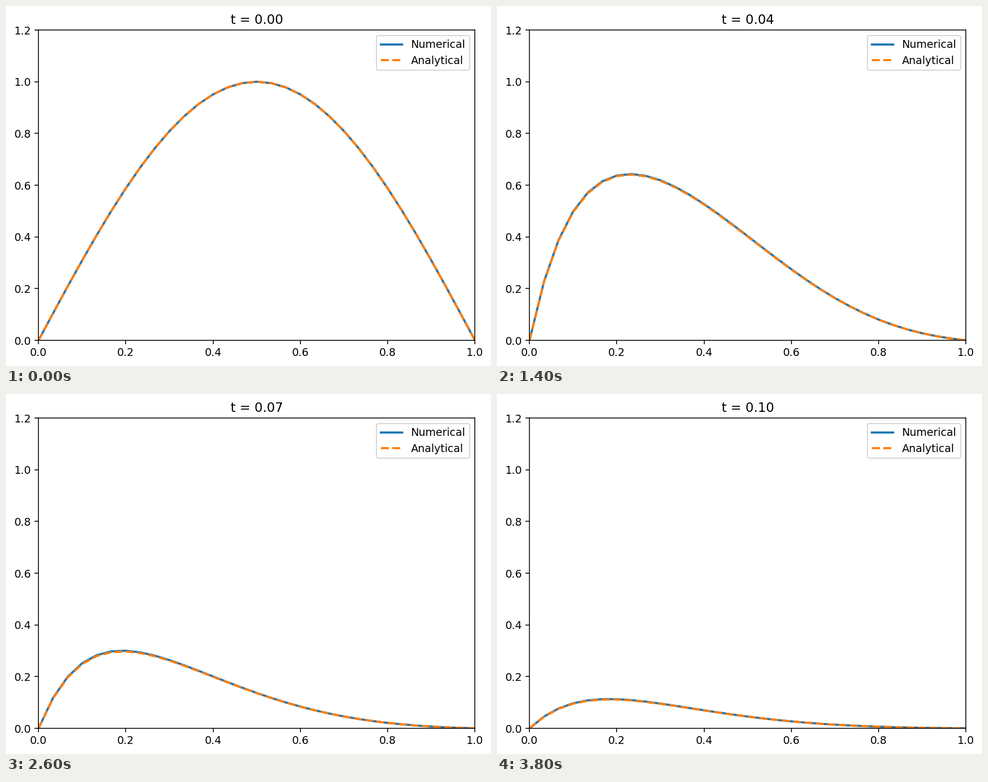
Write a matplotlib script that moves like this. It is 868x645 px and loops after 4000 ms.

```python
import numpy as np
import matplotlib.pyplot as plt
from matplotlib.animation import FuncAnimation

W, H, DPI = 868, 645, 138
LEFT, RIGHT, TOP, BOTTOM = 58.2, 839.3, 43, 599

# u_t = D u_xx + C u_x on [0, 1], u = 0 at both ends, u(x, 0) = sin(pi x)
D, C = 1.0, 10.0
CELLS = 30
FRAMES = 20
x = np.linspace(0, 1, CELLS + 1)
times = np.linspace(0, 0.1, FRAMES)

# Central differences in space, exact in time through the eigenvectors
h = 1 / CELLS
size = CELLS - 1
A = (np.eye(size) * (-2 * D / h**2)
     + np.eye(size, k=1) * (D / h**2 + C / (2 * h))
     + np.eye(size, k=-1) * (D / h**2 - C / (2 * h)))
rates, modes = np.linalg.eig(A)
weights = np.linalg.solve(modes, np.sin(np.pi * x[1:-1]))


def numerical(t):
    u = np.zeros_like(x)
    u[1:-1] = np.real(modes @ (weights * np.exp(rates * t)))
    return u


# Sine series of exp(a x) sin(pi x)
a = C / (2 * D)
n = np.arange(1, 201)


def cos_integral(m):
    return a * (np.exp(a) * (-1.0) ** m - 1) / (a**2 + (m * np.pi) ** 2)


coeffs = cos_integral(n - 1) - cos_integral(n + 1)
sines = np.sin(np.pi * np.outer(x, n))


def analytical(t):
    decay = np.exp(-D * (a**2 + (n * np.pi) ** 2) * t)
    if t == 0:
        return np.sin(np.pi * x)
    return np.exp(-a * x) * (sines @ (coeffs * decay))


plt.rcParams["font.family"] = "DejaVu Sans"
fig = plt.figure(figsize=((W + 1e-4) / DPI, (H + 1e-4) / DPI), dpi=DPI,
                 facecolor="white")
ax = fig.add_axes([LEFT / W, 1 - BOTTOM / H,
                   (RIGHT - LEFT) / W, (BOTTOM - TOP) / H])
ax.set_xlim(0, 1)
ax.set_ylim(0, 1.2)
num_line, = ax.plot(x, numerical(0), lw=2, color="C0", label="Numerical")
ana_line, = ax.plot(x, analytical(0), "--", lw=2, color="C1",
                    label="Analytical")
ax.legend(loc="upper right")
title = ax.set_title("t = 0.00")


def update(i):
    t = times[i]
    num_line.set_ydata(numerical(t))
    ana_line.set_ydata(analytical(t))
    title.set_text(f"t = {t:.2f}")
    return num_line, ana_line, title


anim = FuncAnimation(fig, update, frames=FRAMES, interval=200,
                     repeat=True, repeat_delay=0, blit=False)
plt.show()
```
